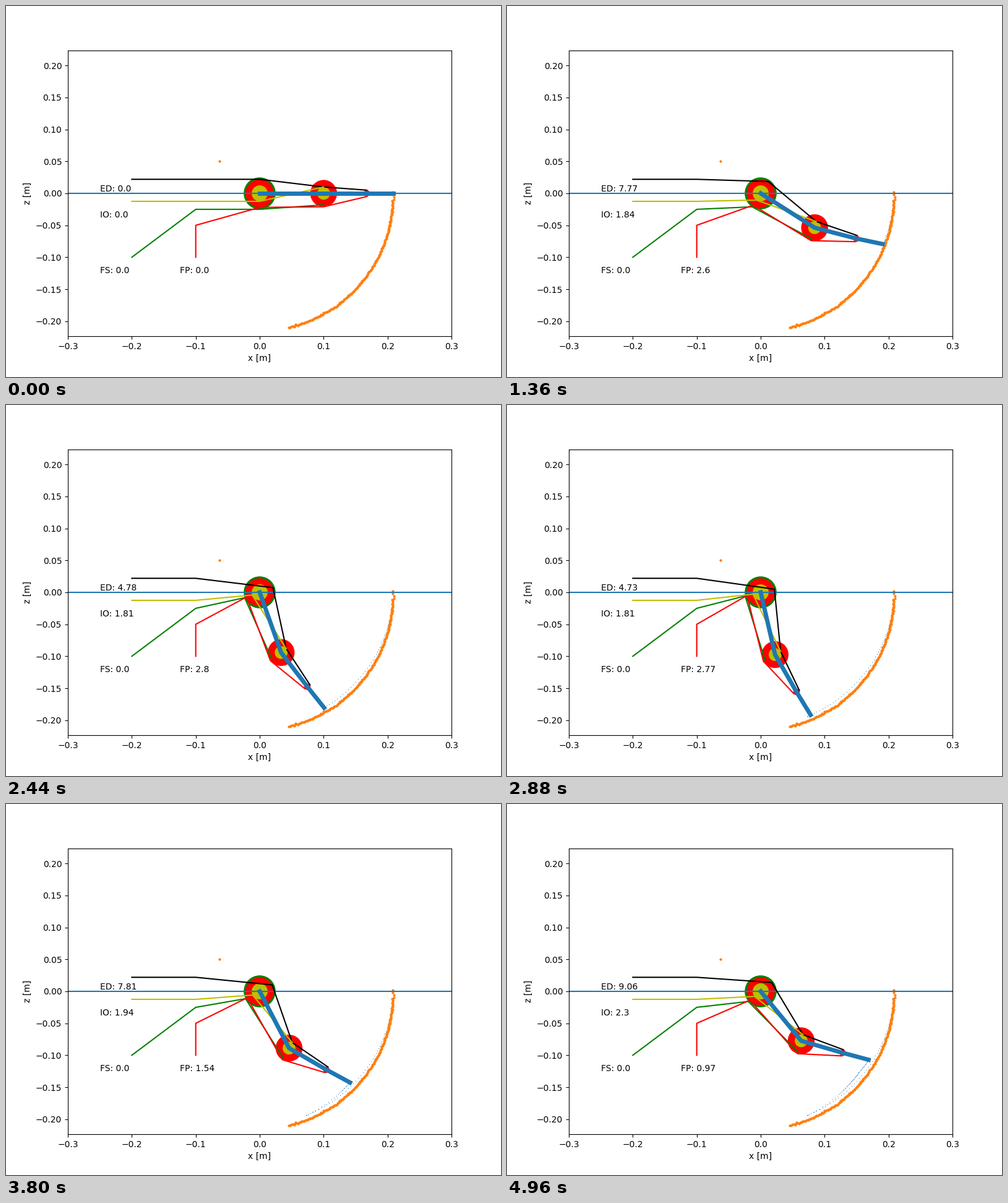
These frames come from a looping animation (800x600 px, 5 s). A matplotlib script:

```python
import numpy as np
import matplotlib.pyplot as plt
from matplotlib.animation import FuncAnimation

FRAMES = 125
LINKS = (0.1, 0.0675, 0.042)

# Key poses: absolute link angles below the horizontal, and tendon forces
KEYS = np.array([0, 13, 34, 61, 69, 83, 109, 124])
ANGLES = (
    (0, 11.2, 32.5, 70.4, 78, 67.3, 57.9, 50.7),
    (0, 2.9, 14.6, 52.5, 62.5, 38.6, 22.9, 16.2),
    (0, 1.7, 11.8, 51.5, 61, 36.4, 21.7, 15.0),
)
FORCES = {
    "ED": (0, 7.61, 7.77, 4.78, 4.5, 6.84, 8.58, 9.06),
    "IO": (0, 2.5, 1.84, 1.81, 1.8, 1.91, 1.99, 2.3),
    "FS": (0,) * 8,
    "FP": (0, 1.66, 2.6, 2.8, 2.9, 1.7, 1.39, 0.97),
}


def smooth(values):
    """Monotone cubic through the key values, sampled at every frame."""
    v = np.array(values, float)
    h = np.diff(KEYS)
    d = np.diff(v) / h
    m = np.zeros(len(v))
    for k in range(1, len(v) - 1):
        if d[k - 1] * d[k] > 0:
            m[k] = 2 * d[k - 1] * d[k] / (d[k - 1] + d[k])
    m[-1] = d[-1]
    t = np.arange(FRAMES)
    i = np.clip(np.searchsorted(KEYS, t, side="right") - 1, 0, len(h) - 1)
    s = (t - KEYS[i]) / h[i]
    return ((1 + 2 * s) * (1 - s) ** 2 * v[i] + s * (1 - s) ** 2 * h[i] * m[i]
            + s * s * (3 - 2 * s) * v[i + 1] + s * s * (s - 1) * h[i] * m[i + 1])


angles = np.radians([smooth(a) for a in ANGLES])
forces = {name: smooth(f) for name, f in FORCES.items()}


def pose(i):
    """Joint positions (base to tip) and the upward normal of each link."""
    q = angles[:, i]
    steps = np.column_stack([np.cos(q), -np.sin(q)]) * np.array(LINKS)[:, None]
    joints = np.vstack([[0, 0], np.cumsum(steps, axis=0)])
    return joints, np.column_stack([np.sin(q), np.cos(q)])


tips = np.array([pose(i)[0][-1] for i in range(FRAMES)])

# Tendons: colour, fixed guide points, signed lever arm at each joint
TENDONS = (
    ("g", [(-0.2, -0.1), (-0.1, -0.025)], (-0.025, -0.018)),
    ("r", [(-0.1, -0.1), (-0.1, -0.05)], (-0.022, -0.021, -0.005)),
    ("k", [(-0.2, 0.022), (-0.1, 0.022)], (0.022, 0.01, 0.005)),
    ("y", [(-0.2, -0.0125), (-0.1, -0.0125)], (-0.0125, 0.01)),
)
# Pulleys: joint, radius, colour
PULLEYS = ((0, 0.025, "g"), (0, 0.022, "r"), (0, 0.0125, "y"),
           (1, 0.021, "r"), (1, 0.01, "y"), (2, 0.005, "r"))
LABELS = {"ED": (-0.25, 0.0027), "IO": (-0.25, -0.0375),
          "FS": (-0.25, -0.125), "FP": (-0.125, -0.125)}

fig, ax = plt.subplots(figsize=(8, 6), dpi=100)
ax.set_xlim(-0.3, 0.3)
half = 0.3 * 462 / 620
ax.set_ylim(-half, half)
ax.set_xlabel("x [m]")
ax.set_ylabel("z [m]")

trail, = ax.plot([], [], ",", color="C0")

# Measured fingertip path with slight scatter, plus one stray reading
rng = np.random.default_rng(4)
theta = np.radians(np.concatenate([[-0.5, 0.6, 1.6, 2.6],
                                   np.linspace(3.2, 77.7, 170)]))
radius = 0.2082 + 0.0066 * theta / theta[-1] + rng.normal(0, 0.0005, theta.size)
radius[2:4] += 0.0012
ax.plot(np.append(radius * np.cos(theta), -0.0625),
        np.append(-radius * np.sin(theta), 0.05), ".", color="C1", ms=4)

ax.axhline(0, color="C0")
wheels = [ax.add_patch(plt.Circle((0, 0), r, color=c, lw=0))
          for _, r, c in PULLEYS]
cords = [ax.plot([], [], color=c)[0] for c, _, _ in TENDONS]
bones, = ax.plot([], [], color="C0", lw=5)
texts = {name: ax.text(x, z, "") for name, (x, z) in LABELS.items()}


def update(i):
    joints, normals = pose(i)
    bones.set_data(joints[:, 0], joints[:, 1])
    for wheel, (j, _, _) in zip(wheels, PULLEYS):
        wheel.center = joints[j]
    for cord, (_, guide, arms) in zip(cords, TENDONS):
        n = len(arms)
        wrap = joints[:n] + normals[:n] * np.array(arms)[:, None]
        path = np.vstack([guide, wrap])
        cord.set_data(path[:, 0], path[:, 1])
    trail.set_data(tips[:i + 1, 0], tips[:i + 1, 1])
    for name, text in texts.items():
        text.set_text(f"{name}: {round(float(forces[name][i]), 2)}")
    return [bones, trail, *wheels, *cords, *texts.values()]


anim = FuncAnimation(fig, update, frames=FRAMES, interval=40,
                     repeat=True, repeat_delay=0)
plt.show()
```
